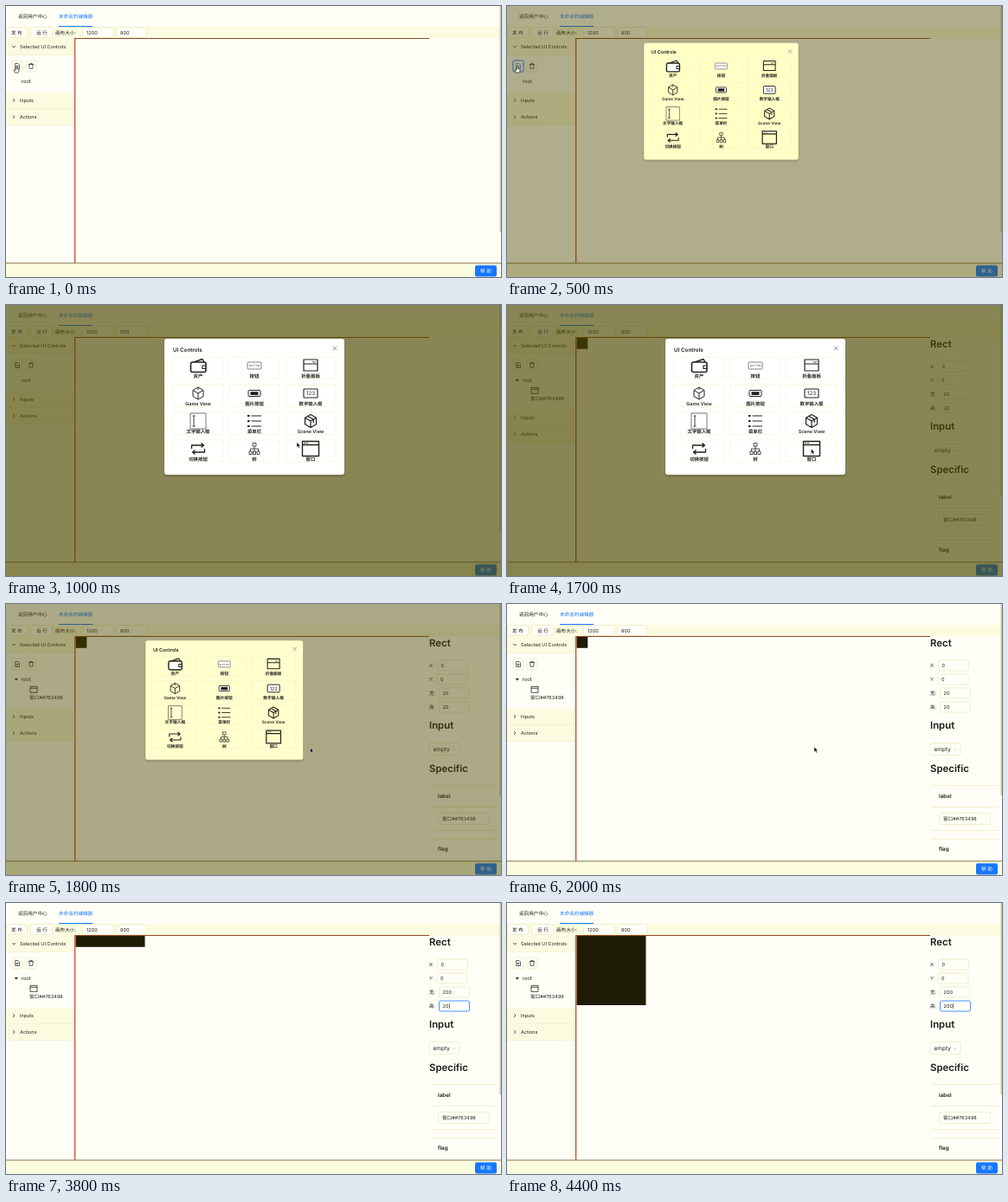
These frames come from a looping animation (572 px wide and 313 px high, 4500 ms). An HTML page:

```html
<!DOCTYPE html>
<html lang="zh">
<head>
<meta charset="utf-8">
<title>UI editor</title>
<style>
html, body { margin: 0; width: 100%; height: 100%; overflow: hidden; background: #fffff8; }
svg { display: block; width: 572px; height: 313px; }
text { font-family: Inter, "Noto Sans CJK SC", "Noto Sans CJK", sans-serif; text-rendering: geometricPrecision; white-space: pre; }
</style>
</head>
<body>
<svg id="stage" viewBox="0 0 572 313"></svg>
<script>
const LOOP = 4500, STEP = 100;
const INK = '#22221c', BLUE = '#1677ff', WHITE = '#fffff8', PANEL = '#fbfbe0', EDGE = '#ebebbb';
const OPEN_AT = 430, CLOSE_AT = 1700, ZOOM = 300;
const ORIGIN = [8.5, 66];
const stage = document.getElementById('stage');

const rect = (x, y, w, h, fill, extra = '') =>
  `<rect x="${x}" y="${y}" width="${w}" height="${h}" fill="${fill}" ${extra}/>`;
const box = (x, y, w, h, stroke = EDGE, r = 2) =>
  rect(x + .5, y + .5, w - 1, h - 1, WHITE, `stroke="${stroke}" stroke-width=".8" rx="${r}"`);
const path = (d, width = .8, stroke = INK, fill = 'none') =>
  `<path d="${d}" stroke="${stroke}" stroke-width="${width}" fill="${fill}" stroke-linejoin="round"/>`;
const text = (x, y, str, size = 5.6, fill = INK, extra = '') =>
  `<text x="${x}" y="${y}" font-size="${size}" fill="${fill}" ${extra}>${str}</text>`;
const bold = (x, y, str, size) => text(x, y, str, size, '#1c1c16', 'font-weight="600"');
const at = (x, y, body) => `<g transform="translate(${x} ${y})">${body}</g>`;

const clamp = v => Math.min(1, Math.max(0, v));

function bezier(x1, y1, x2, y2, p) {
  const curve = (a, b, u) => 3 * u * (1 - u) ** 2 * a + 3 * u * u * (1 - u) * b + u ** 3;
  let lo = 0, hi = 1;
  for (let i = 0; i < 24; i++) {
    const mid = (lo + hi) / 2;
    if (curve(x1, x2, mid) < p) lo = mid; else hi = mid;
  }
  return curve(y1, y2, (lo + hi) / 2);
}

// How far the dialog is open, 0 to 1
function openness(t) {
  if (t < CLOSE_AT) return t <= OPEN_AT ? 0 : bezier(.08, .82, .17, 1, clamp((t - OPEN_AT) / ZOOM));
  return t >= CLOSE_AT + ZOOM ? 0 : 1 - bezier(.78, .14, .15, .86, (t - CLOSE_AT) / ZOOM);
}

const icons = {
  wallet: path('M-8 -3L5 -7.5L7 -4', 1.4) +
    rect(-8.5, -4, 17.5, 11.5, '#fff', `rx="2" stroke="${INK}" stroke-width="1.6"`) +
    path('M9 0H5V3.5H9', 1.2),
  button: rect(-8, -4, 16, 8, '#fff', 'rx="1" stroke="#666" stroke-width=".8"') +
    text(0, 1.2, 'BUTTON', 3, '#444', 'text-anchor="middle"'),
  collapse: path('M-8 -7H8V6H-8ZM-8 -2H8', 1.2) + path('M2 -5L4 -3.5L6 -5'),
  cube: path('M0 -7L6 -3.5V3.5L0 7L-6 3.5V-3.5ZM0 0V7M0 0L-6 -3.5M0 0L6 -3.5M0 -7V-4', 1),
  image: rect(-7, -3.5, 14, 7, '#fff', `rx="1" stroke="${INK}" stroke-width="1"`) + rect(-4.5, -1.8, 9, 3.8, INK),
  number: rect(-8, -5, 16, 10, '#fff', `rx=".8" stroke="${INK}" stroke-width="1.1"`) +
    text(0, 2.3, '123', 6.2, INK, 'text-anchor="middle"'),
  input: path('M-9 -9H9V9H-9Z', .8, '#555') + path('M-5 -6V6M-6.5 -6H-3.5M-6.5 6H-3.5', .9),
  menu: [-6, 0, 6].map(y => rect(-8, y - 1, 2.6, 2, INK) + path(`M-3.5 ${y}H8`, 1)).join(''),
  scene: path('M0 -7.5L6.5 -3.8V3.8L0 7.5L-6.5 3.8V-3.8ZM0 0V7.5M0 0L-6.5 -3.8M0 0L6.5 -3.8M-3.2 -5.6L3.2 -2V2', 1.2),
  swap: path('M-7.5 0V-4H6M3.5 -6.5L6.5 -4L3.5 -1.5M7.5 0V4H-6M-3.5 1.5L-6.5 4L-3.5 6.5', 1.3),
  tree: path('M-2 -6.5H2V-3H-2ZM0 -3V3M-4.5 3V0H4.5V3M-6 3H-3V6.5H-6ZM-1.5 3H1.5V6.5H-1.5ZM3 3H6V6.5H3Z', .8),
  window: path('M-9.5 -8.5H9.5V8.5H-9.5ZM-9.5 -4.5H9.5', 1.4) + path('M-7.5 -6.5H-6M-4.8 -6.5H-3.3', 1)
};

const controls = [
  ['wallet', '资产'], ['button', '按钮'], ['collapse', '折叠面板'],
  ['cube', 'Game View'], ['image', '图片按钮'], ['number', '数字输入框'],
  ['input', '文字输入框'], ['menu', '菜单栏'], ['scene', 'Scene View'],
  ['swap', '切换按钮'], ['tree', '树'], ['window', '窗口']
];

function header() {
  return text(14, 14, '返回用户中心') + text(61, 14, '未命名的编辑器', 5.6, BLUE) + rect(61, 23, 39, 1, BLUE) +
    rect(0, 24, 572, 13.5, PANEL) +
    box(0, 24, 25, 13) + text(6, 33, '发 布') +
    box(28, 24, 26, 13) + text(35, 33, '运 行') +
    text(57, 33, '画布大小:') +
    box(88, 24, 37, 13) + text(93, 33, '1200') +
    box(127, 24, 36, 13) + text(132, 33, '800');
}

function section(y, label, open) {
  const chevron = open ? 'M7 -1L9 1L11 -1' : 'M8 -2L10 0L8 2';
  return at(0, y, rect(0, -9, 79, 18, PANEL) + rect(0, 9, 79, .6, EDGE) +
    path(chevron, .7) + text(16, 2, label, 5.5));
}

function sidebar(t, added) {
  const lit = t >= 200 && t < 800, shift = added ? 21 : 0;
  let out = section(47, 'Selected UI Controls', true);
  if (lit) out += rect(6, 62, 14, 15, '#cfe2ff', 'rx="2.5"');
  out += box(6.5, 62.5, 13, 14, lit ? BLUE : EDGE) + box(22.5, 62.5, 13, 14) +
    at(13, 69.5, path('M-2.3 -3H1L2.5 -1.5V3H-2.3ZM0 -1V2M-1.5 .5H1.5', .7, lit ? BLUE : INK)) +
    at(29, 69.3, path('M-3 -1.8H3M-1.2 -1.8V-3H1.2V-1.8M-2.2 -1.8L-1.8 3H1.8L2.2 -1.8', .7)) +
    text(17.5, 89, 'root', 6);
  if (added) {
    out += path('M10 86H13.6L11.8 88.5Z', .2, INK, INK) +
      at(32, 98.8, path('M-4 -3.5H4V3.5H-4ZM-4 -1.5H4', .8)) + text(27, 110, '窗口##763498');
  }
  return out + section(109 + shift, 'Inputs') + section(128 + shift, 'Actions');
}

function canvas(added, w, h) {
  const size = v => Math.max(32, v) * .4;
  return (added ? rect(80.5, 38, size(w), size(h), '#1f1c05') : '') +
    rect(79, 37, 410, 1, '#8f4a28') + rect(79, 37, 1.3, 260, '#cf4a1c') +
    rect(0, 297, 572, 16, PANEL) + rect(0, 296.5, 572, 1, '#8b7548');
}

function field(x, y, label, value, focused, spinner) {
  let out = text(489, y + 2, label) + box(x, y - 6.5, 36, 13, focused ? BLUE : EDGE) + text(x + 4.5, y + 2, value);
  if (focused) out += rect(x + 5 + String(value).length * 3.5, y - 3, .6, 6, INK);
  if (spinner) out += at(x + 30, y, path('M-3.5 -5.5V5.5M-3.5 0H5M-1 -2L.8 -3.6L2.6 -2M-1 2L.8 3.6L2.6 2', .5, '#aaa98a'));
  return out;
}

function inspector(t, w, h) {
  const wide = t >= 2700 && t < 3400, tall = t >= 3500;
  return bold(489, 49, 'Rect', 11.4) +
    field(498, 71, 'X:', 0) + field(497.5, 87, 'Y:', 0) +
    field(500, 103, '宽:', w, wide, wide) + field(500, 119, '高:', h, tall, tall && t < 3700) +
    bold(489, 144, 'Input', 11.4) +
    box(488.5, 160, 36, 15) + text(493.5, 170, 'empty', 6.5) + path('M516 167L517.7 168.8L519.4 167', .6, '#bbb') +
    bold(489, 194, 'Specific', 11.4) +
    [209, 234, 261, 271].map(y => rect(490, y, 78, .7, EDGE)).join('') +
    bold(499, 223.5, 'label', 6.3) + box(499, 241, 60, 14) + text(504, 250, '窗口##763498') +
    bold(499, 285, 'flag', 6.3);
}

function dialog(open) {
  if (!open) return '';
  const scale = .2 + .8 * open, [ox, oy] = ORIGIN;
  const blue = Math.round(Math.max(150, 255 - 320 * (1 - open)));
  const cells = controls.map(([icon, label], i) => {
    const col = i % 3, row = Math.floor(i / 3), x = 222 + col * 65, y = 70 + row * 32;
    return rect(x - 29, y - 10, 58, 25, 'none', 'stroke="#f0f0cc" stroke-width=".6"') +
      at(x, y, icons[icon]) + text(x, y + 14.3, label, 5.4, INK, 'text-anchor="middle" font-weight="600"');
  }).join('');
  return rect(0, 0, 572, 313, '#4b4500', `opacity="${.65 * open * open}"`) +
    `<g opacity="${Math.min(1, open * 1.3)}" transform="translate(${ox} ${oy}) scale(${scale}) translate(${-ox} ${-oy})">` +
    rect(182, 40, 210, 159, '#000', 'rx="4" opacity=".1"') +
    rect(183, 39, 208, 157, `rgb(255,255,${blue})`, 'rx="3"') +
    bold(193, 53.7, 'UI Controls', 6.3) + path('M377.7 47.7L382.3 52.3M382.3 47.7L377.7 52.3', .7, '#777') +
    cells + '</g>';
}

const route = [
  [0, 12, 70], [600, 12, 70], [1000, 336, 158.5], [1400, 351, 166], [1800, 351.5, 166],
  [2000, 355, 165], [2200, 355, 165], [2600, 514, 103], [3100, 514, 103], [3200, 518, 123], [3500, 514, 120]
];

function pointer(t) {
  if (t >= 3700 || (t >= 2800 && t < 3100)) return '';
  let i = 0;
  while (i < route.length - 2 && t >= route[i + 1][0]) i++;
  const [ta, xa, ya] = route[i], [tb, xb, yb] = route[i + 1];
  const p = clamp((t - ta) / (tb - ta)), k = p * p * (3 - 2 * p);
  let shape;
  if (t < 700) shape = path('M-.8 0Q0 -1 .8 0V2.4L3 3V5L2 7H-1.5L-3 4L-2.2 3.4L-.8 4.4Z', .7, INK, '#fff');
  else if (t < 2500) shape = path('M0 0V6L1.4 4.7L2.5 7L3.5 6.5L2.5 4.3H4.3Z', .5, '#fff', '#000');
  else shape = path('M-1.6 -3Q0 -3 0 -2Q0 -3 1.6 -3M0 -2V2.3M-1.6 3.2Q0 3.2 0 2.2Q0 3.2 1.6 3.2', .8);
  return at(xa + (xb - xa) * k, ya + (yb - ya) * k, shape);
}

function scene(t) {
  const added = t >= CLOSE_AT, w = t >= 3000 ? 200 : 20, h = t >= 4000 ? 200 : 20;
  return rect(0, 0, 572, 313, WHITE) + header() + sidebar(t, added) + canvas(added, w, h) +
    (added ? inspector(t, w, h) : '') +
    rect(570.5, 0, 1.5, added ? 221 : 261, '#c9c9a8') +
    rect(542, 299.5, 25, 13, BLUE, 'rx="2"') + text(548, 308, '帮 助', 5.6, '#fff') +
    dialog(openness(t)) + pointer(t);
}

const start = performance.now();
let shown = -1;
function tick() {
  const t = Math.floor(((performance.now() - start) % LOOP) / STEP) * STEP;
  if (t !== shown) stage.innerHTML = scene(shown = t);
  requestAnimationFrame(tick);
}
tick();
</script>
</body>
</html>
```
